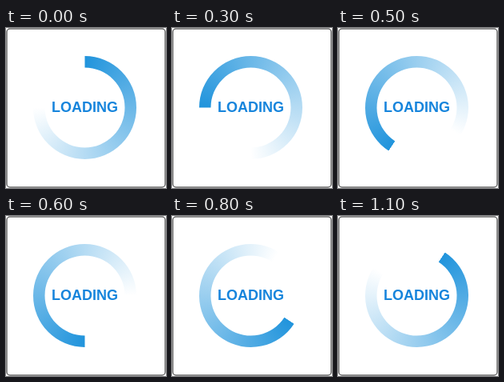
An HTML page with a canvas that plays this animation: 200x200 px, repeating every 1200 ms.

```html
<!DOCTYPE html>
<html lang="en">
<head>
<meta charset="utf-8">
<title>Loading</title>
<style>
  html, body { margin: 0; width: 100%; height: 100%; overflow: hidden; background: #fff; }
  canvas { display: block; width: 200px; height: 200px; }
</style>
</head>
<body>
<canvas id="stage"></canvas>
<script>
const SIZE = 200, STEP = 100, STEPS = 12;
const CX = 98.5, CY = 99.5, OUTER = 64.5, INNER = 50;
const SWEEP = Math.PI * 1.5;
const QUARTER = [0, 33.5, 57]; // degrees turned within each quarter

const canvas = document.getElementById('stage');
const ctx = canvas.getContext('2d');
const ratio = window.devicePixelRatio || 1;
canvas.width = canvas.height = SIZE * ratio;
ctx.scale(ratio, ratio);

function drawFrame() {
  ctx.strokeStyle = '#686868';
  ctx.lineWidth = 1.5;
  ctx.beginPath();
  ctx.roundRect(1, 1, 198, 198, 4);
  ctx.stroke();
}

function drawRing(step) {
  const turned = Math.floor(step / 3) * 90 + QUARTER[step % 3];
  const head = -(90 + turned) * Math.PI / 180;
  const fade = ctx.createConicGradient(0, 0, 0);
  fade.addColorStop(0, 'rgb(33, 148, 220)');
  fade.addColorStop(0.75, 'rgba(33, 148, 220, 0)');
  ctx.save();
  ctx.translate(CX, CY);
  ctx.rotate(head);
  ctx.fillStyle = fade;
  ctx.beginPath();
  ctx.arc(0, 0, OUTER, 0, SWEEP);
  ctx.arc(0, 0, INNER, SWEEP, 0, true);
  ctx.closePath();
  ctx.fill();
  ctx.restore();
}

function drawLabel() {
  ctx.font = 'bold 18px "Liberation Sans", Arial, sans-serif';
  ctx.fillStyle = '#1785dc';
  ctx.fillText('LOADING', 57, 105);
}

function draw(step) {
  ctx.fillStyle = '#fff';
  ctx.fillRect(0, 0, SIZE, SIZE);
  drawFrame();
  drawRing(step);
  drawLabel();
}

const start = performance.now();
function tick() {
  const time = Math.max(0, performance.now() - start);
  draw(Math.floor(time / STEP) % STEPS);
  requestAnimationFrame(tick);
}
tick();
</script>
</body>
</html>
```
